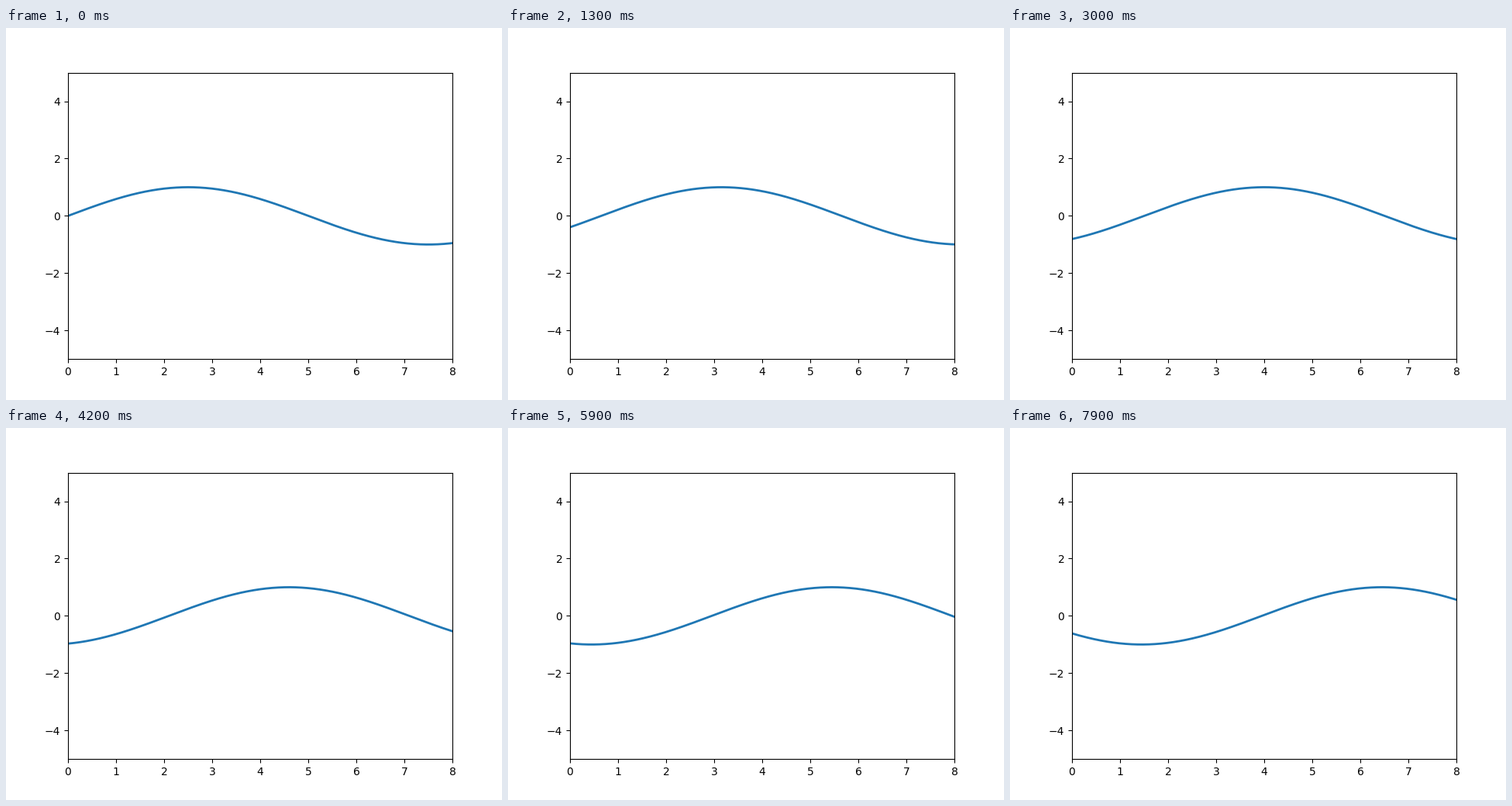
Recreate the animation shown at these times as a matplotlib script. Size 640x480 px, loop 8000 ms.

```python
import numpy as np
import matplotlib.pyplot as plt
from matplotlib.animation import FuncAnimation

FRAMES = 80
INTERVAL = 100      # ms
WAVELENGTH = 10
SPEED = 0.5         # x units per second

fig, ax = plt.subplots(figsize=(6.4, 4.8), dpi=100)
ax.set(xlim=(0, 8), ylim=(-5, 5))

x = np.linspace(0, 8, 1000)
line, = ax.plot([], [], lw=2)


def update(i):
    shift = SPEED * i * INTERVAL / 1000
    line.set_data(x, np.sin(2 * np.pi * (x - shift) / WAVELENGTH))
    return line,


anim = FuncAnimation(fig, update, frames=FRAMES, interval=INTERVAL,
                     repeat=True, repeat_delay=0, blit=False)
plt.show()
```
